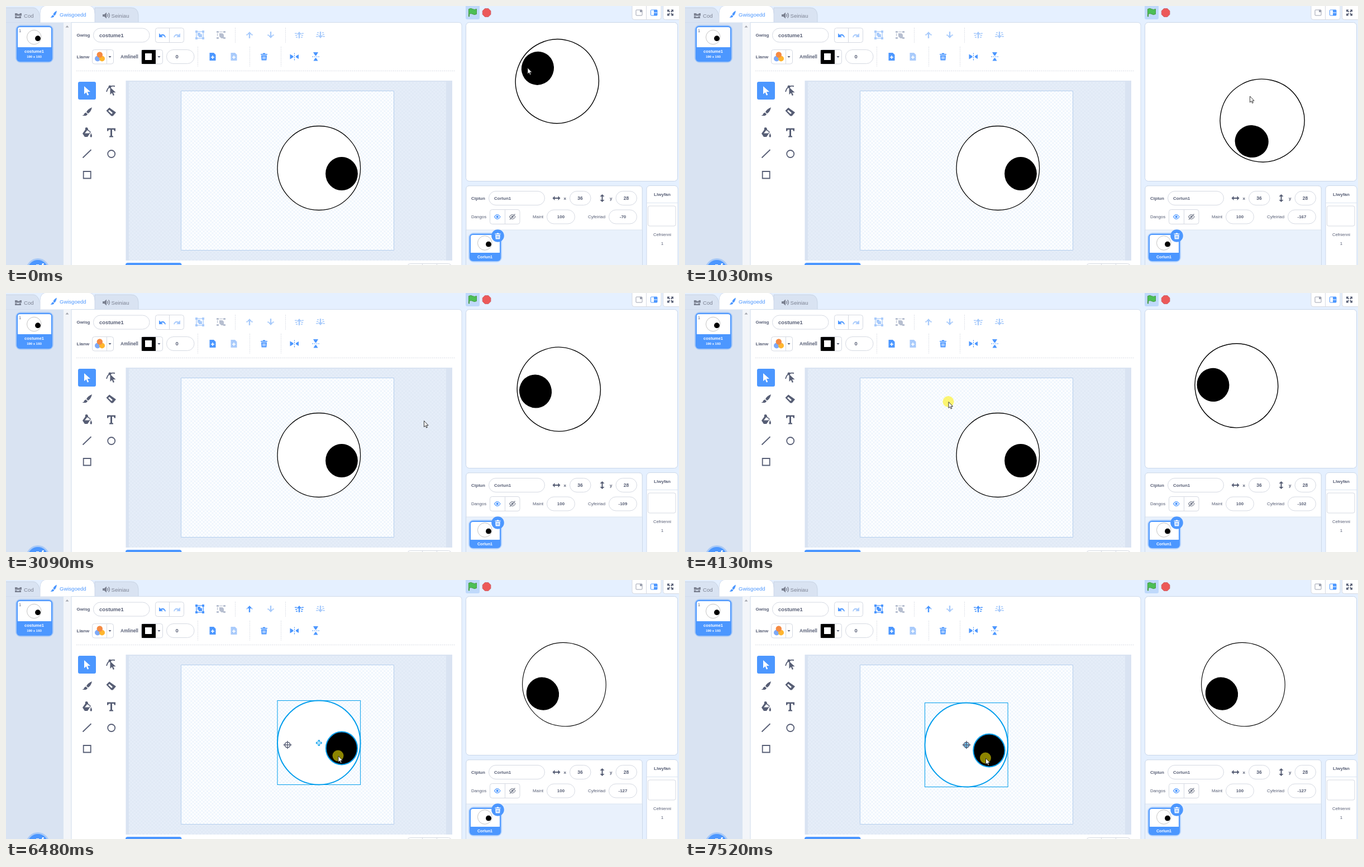
Animation of 1205x465 px, one loop 8000 ms. Source, as an HTML page:

```html
<!DOCTYPE html>
<html lang="cy">
<head>
<meta charset="utf-8">
<title>Googly eye editor</title>
<style>
html, body { margin: 0; width: 100%; height: 100%; overflow: hidden; background: #e5f0ff; }
svg { display: block; font-family: "Liberation Sans", Arial, sans-serif; font-size: 8px; fill: #575e75; }
.b { font-weight: bold; }
.m { text-anchor: middle; }
.box { fill: #fff; stroke: #d5d9e2; }
.sep { stroke: #d9dde5; stroke-dasharray: 2 1.5; fill: none; }
.blue { fill: #4c97ff; }
.pale { fill: #a9cbfb; }
.on { fill: #4c97ff; }
.white { fill: #fff; }
.line { fill: none; stroke: #575e75; stroke-width: 1.8; }
.glow { fill: none; stroke: #4c97ff; stroke-opacity: .35; stroke-width: 6; }
.guide { fill: none; stroke: #009dec; }
</style>
</head>
<body>
<svg width="1205" height="465" viewBox="0 0 1205 465">
<defs>
  <pattern id="out" width="6.35" height="6.35" patternUnits="userSpaceOnUse"><path fill="#e6eef9" d="M0 0h6.35v6.35H0z"/><path fill="#e0e9f5" d="M0 0h3.175v6.35h3.175V3.175H0z"/></pattern>
  <pattern id="in" width="6.35" height="6.35" patternUnits="userSpaceOnUse"><path fill="#fff" d="M0 0h6.35v6.35H0z"/><path fill="#eef5fd" d="M0 0h3.175v6.35h3.175V3.175H0z"/></pattern>
  <clipPath id="stageClip"><rect x="824" y="30" width="378" height="284" rx="6"/></clipPath>
  <g id="eye"><ellipse cx="56.3" cy="-5" rx="74.3" ry="75.5" fill="#fff"/><ellipse cx="97" cy="5" rx="28.2" ry="29.4" fill="#000"/></g>
  <g id="thumb"><circle r="12.8" fill="#fff" stroke="#aaa" stroke-width=".7"/><circle cx="6.7" cy="2.2" r="4.9" fill="#000"/></g>
  <path id="undo" d="M-6-4v7h7l-2.4-2.3q3.8-2.2 6 2.8l1.4-.5q-2.6-7.800-9.200-4.200z"/>
  <path id="up" d="M0-6l4.500 5H1.200V6h-2.400v-7h-3.300z"/>
  <path id="bin" d="M-6-5h3.500l1-1.600h3l1 1.600H6v1.600H-6zM-5-2.400H5L4.400 6.500h-8.800zM-2.500-.6v5h1v-5zM-.5-.6v5h1v-5zM1.500-.6v5h1v-5z" fill-rule="evenodd"/>
  <path id="page" d="M-5.500-7H2l3.500 3.500V7h-11zM-.8-2v2.200H-3v1.600h2.200V4H.8V1.800H3V.2H.8V-2z" fill-rule="evenodd"/>
  <path id="flip" d="M-8-4.500v9L-2 1v-2zM-.6-6.500H.6v2H-.6zm0 3.500H.6v2H-.6zm0 3.500H.6v2H-.6zM-.6 4H.6v2.500H-.6zM2.500-1 7.500-4v8l-5-3z"/>
  <path id="arrow" d="M0 0v13l3.300-3 2 5 2.200-1-2.200-4.800h4.700z"/>
  <path id="span" d="M-7 0l4-4v3h6v-3l4 4-4 4v-3h-6v3z"/>
</defs>

<!-- tabs -->
<path fill="#d9e3f2" stroke="#c8d3e4" d="M-1 30V3h49q13 0 14 27z"/>
<path fill="#d9e3f2" stroke="#c8d3e4" d="M159 30V3h65q12 0 13 13v14z"/>
<path fill="#fff" stroke="#d2dced" d="M61 30V14Q61-1 74-1h72q13 0 13 15v16z"/>
<g fill="#7c8292" font-size="9.6">
  <path d="M16 13h4l1 1.500h3L25 13h3v4.500H16zM16 18.500h3l1 1.300h3l1-1.300h3V22H16z"/>
  <text x="32" y="20.500">Cod</text>
  <path d="M173 15h3l4-3.500v11L176 19h-3z"/><path fill="none" stroke="#7c8292" stroke-width="1.300" d="M181.500 14.500q2 2.500 0 5M183.500 12.500q4 4.500 0 9"/>
  <text x="188.500" y="20.500">Seiniau</text>
</g>
<g class="blue"><path d="M91 8.500q-6 3-6.500 7l2.500 2q3-2.500 4-9zM84 16.200l2.300 1.800q-.5 3.500-6.800 2.500 2.500-.8 2.500-3z"/><text x="96" y="18.500" font-size="9.500">Gwisgoedd</text></g>

<!-- costume list -->
<path fill="#d9e3f2" d="M0 30h103v435H0z"/><path fill="#f3f5f9" d="M103 30h14v435h-14z"/><path fill="#a3a6ad" d="M106.500 38.500l3-3.500 3 3.500z"/>
<rect class="glow" x="20" y="37" width="62" height="62" rx="6"/>
<rect class="blue" x="19" y="36" width="64" height="64" rx="6"/><path class="white" d="M21 42q0-4 4-4h52q4 0 4 4v32H21z"/>
<text x="23" y="47" font-size="7.500">1</text><use href="#thumb" x="50.300" y="56"/>
<g class="white b m"><text x="50.500" y="84" font-size="7.500">costume1</text><text x="50.500" y="93" font-size="6">190 x 193</text></g>
<circle class="glow" cx="57" cy="474" r="18"/><circle class="blue" cx="57" cy="474" r="18"/><path class="white" d="M64 465l1-3 3 0-1 3zM54 464h5v1h-5z"/>

<!-- editor -->
<path fill="#fff" stroke="#d0dcec" d="M117 466V29.500h693q6 0 6 6V466z"/>
<g class="b"><text x="126.500" y="55">Gwisg</text><text x="126.500" y="93.500">Llanw</text><text x="205" y="93.500" font-size="8.200">Amlinell</text></g>
<rect class="box" x="156.500" y="40" width="100.500" height="25" rx="12.500"/><text class="b" x="167" y="56" font-size="9.400">costume1</text>
<rect class="box" x="267.500" y="39.500" width="51" height="26" rx="4"/><path class="box" d="M292.500 40v25.500"/>
<use href="#undo" class="blue" x="280" y="53"/><use href="#undo" class="pale" transform="translate(306 53)scale(-1 1)"/>
<g id="tools">
  <g class="pale" transform="translate(347 52)"><path fill-rule="evenodd" d="M-8-8h4v1.200h8V-8h4v4H6.800v8H8v4H4V6.800h-8V8h-4V4h1.200v-8H-8zM-5.500-4v8h1.500v1.500h8V4h1.500v-8H4v-1.500h-8V-4z"/><path d="M-4-4h5v2.500h3V4h-6V1.500h-2z"/></g>
  <use href="#up" class="pale" x="436" y="52"/>
  <g class="pale" transform="translate(525 52)"><use href="#up"/><path d="M-8-3.500h4V-2h-4zM4-3.500h4V-2H4zM-7 0h3.500v1.500H-7zM3.500 0H7v1.500H3.500zM-6 3.500h3V5h-3zM3 3.500h3V5H3z"/></g>
</g>
<path class="pale" d="M430 51h3v1.500h-3zM439 51h3v1.500h-3zM468 51.500h3V53h-3zM477 51.500h3V53h-3z"/>
<g fill="#b7bfd0" transform="translate(385 52)"><path d="M-8-7h4v3h-4zM4-7h4v3H4zM-8 4h4v3h-4zM4 4h4v3H4zM-3-6h6v1h-6zM-7-3h1v5h-1zM-3-3h5V0h3v6H0V2h-3z"/><circle cx="1" cy="1" r="4"/></g>
<use href="#up" class="pale" transform="translate(474 52)scale(1 -1)"/>
<g class="pale" transform="translate(563 52)scale(1 -1)"><use href="#up"/><path d="M-8-3.500h4V-2h-4zM4-3.500h4V-2H4zM-7 0h3.500v1.500H-7zM3.500 0H7v1.500H3.500zM-6 3.500h3V5h-3zM3 3.500h3V5H3z"/></g>
<path class="sep" d="M410.500 39v27M500.500 39v27M343.500 73v36M436.500 73v36M492.500 73v36M126 116.500h679"/>
<rect class="box" x="154.500" y="78.500" width="38" height="25.500" rx="4"/><path class="box" d="M180.500 79v25"/>
<circle cx="164" cy="94.500" r="5" fill="#7da9f8"/><circle cx="172" cy="94.500" r="5" fill="#ffb52e"/><circle cx="167.800" cy="87.500" r="5.200" fill="#f58a42"/>
<rect class="box" x="242.500" y="78.500" width="38" height="25.500" rx="4"/><path d="M243 79h25v25h-25z" fill="#000"/><path class="white" d="M249 85h12v12h-12z"/>
<path d="M183.500 90h5l-2.500 3zM271.500 90h5l-2.500 3z"/>
<rect class="box" x="287.500" y="78.500" width="49.500" height="25" rx="12.500"/><text class="b m" x="306" y="94" font-size="9.400">0</text>
<use href="#page" class="blue" x="370" y="91"/><use href="#page" class="pale" x="408" y="91"/><use href="#bin" class="blue" x="462" y="91"/>
<use href="#flip" class="blue" x="516.500" y="91"/><use href="#flip" class="blue" transform="translate(554.500 91)rotate(90)"/>

<!-- paint tools -->
<rect class="blue" x="129" y="136" width="32" height="32" rx="3"/><use href="#arrow" class="white" transform="translate(140 144)scale(1.100)"/>
<use href="#arrow" transform="translate(186.500 146)"/><path class="line" stroke-width="1.200" d="M180 154q2-7 6-9t9-1"/><circle cx="186" cy="145" r="2.500"/>
<path d="M154 182q-8 3-10 8.500l3 2.500q5-2.500 7-11zM143 191.500l3 2.500q-1 4.500-10 2.500 4-.5 4-3 1-2 3-2z"/>
<path d="M179.500 188l5.500-5.500 12 8.500-5.500 6.500h-3zM183 188.500l6 5.500 2-2-6-5.500z" fill-rule="evenodd"/>
<path fill-rule="evenodd" d="M137 229l5-7q-1-4 2-4t3 4l5 4-6 9h-5zM141 228.500h8l1.500-2-5-3.500zM152 228q3 5 1.500 7t-3-1z"/>
<path d="M181 219.500h15v5h-2l-1-2.500h-3v11l2 .8v1.700h-7v-1.700l2-.8v-11h-3l-1 2.500h-2z"/>
<path class="line" d="M137.500 272.500l15-14.500M138.700 297h13v12.500h-13z"/><circle class="line" cx="188.700" cy="265.500" r="6.500"/>

<!-- canvas -->
<path fill="#d9e3f2" d="M214.500 134H799v323H214.500z"/><path fill="url(#out)" d="M220 136h568v321H220z"/>
<path fill="url(#in)" stroke="#b5cfee" d="M313.500 152.500h381v286h-381z"/>
<rect class="blue" x="214" y="461" width="100.500" height="20" rx="4"/><rect class="box" x="719.500" y="462.500" width="77" height="20" rx="4"/><path class="box" d="M745.500 463v5M771.500 463v5"/>
<use id="costume" href="#eye"/>
<g id="pick"><rect class="guide" x="-18" y="-80.500" width="148.600" height="151"/><path class="guide" stroke-width="3.500" d="M51-4.500h10.500M56.300-9.800V.7"/><path stroke="#fff" stroke-width="1.300" d="M52.500-4.500h7.600M56.300-8.300V-.7"/></g>
<g id="handles" class="guide" style="fill:#fff"></g>
<g id="cross" fill="none" stroke="#575e75" stroke-width="1.600" transform="translate(504 296)"><circle r="4.800"/><path stroke-width="1.300" d="M-7.300 0H7.300M0-7.300V7.300"/></g>
<rect id="marquee" x="471.500" y="195.500" fill="none" stroke="#9a9da5" stroke-width=".9" stroke-dasharray="3 2"/>

<!-- stage -->
<rect fill="#bfd9fb" x="823" y="-4" width="25" height="28" rx="3"/>
<path fill="#4cbf56" stroke="#45993d" d="M828.500 19V5.500q4-2 7 0t7 0v9q-4 2-7 0t-6 0V19z"/>
<path fill="#ec5959" stroke="#c95f68" stroke-width=".8" d="M857.500 4.500h6.200l4.300 4.300v6.400l-4.300 4.300h-6.200l-4.300-4.300V8.800z"/>
<rect class="box" x="1121" y="-5" width="52" height="29.500" rx="4"/><path class="box" d="M1146.500 0v24"/><rect class="box" x="1176.500" y="-5" width="32" height="29.500" rx="4"/>
<rect x="1128" y="7" width="11" height="10" rx="1" fill="none" stroke="#9a9fae"/><path fill="#9a9fae" d="M1135 7h4v4h-4z"/>
<rect x="1154.500" y="7" width="11.500" height="10" rx="1" fill="none" stroke="#4c97ff"/><path class="blue" d="M1160 7h6v10h-6z"/><path class="white" d="M1160 11.500h6v1h-6z"/>
<path d="M1184 6.500h4.500l-1.500 1.500 2 2-1.500 1.500-2-2-1.500 1.500zM1195 6.500v4.500l-1.500-1.500-2 2-1.500-1.500 2-2-1.500-1.500zM1184 17.500V13l1.500 1.500 2-2 1.500 1.500-2 2 1.500 1.500zM1195 17.500h-4.500l1.500-1.500-2-2 1.500-1.500 2 2 1.500-1.500z"/>
<rect class="box" x="823.500" y="29.500" width="379" height="285" rx="6" style="stroke:#c9d6e8"/>
<g clip-path="url(#stageClip)"><use id="sprite" href="#eye" stroke="#000"/></g>

<!-- sprite info -->
<path fill="#e9f1fc" stroke="#d0dcec" d="M823.500 466V328q0-6 6-6h304q6 0 6 6v138z" transform="translate(0 0)" display="none"/>
<rect x="823.500" y="322.500" width="316" height="160" rx="6" fill="#e9f1fc" stroke="#ccd8e9"/>
<path fill="#fff" stroke="#dbe4f0" d="M824 402V329q0-6 6-6h303q6 0 6 6v73z"/>
<g class="box">
  <rect x="864.500" y="332.500" width="100" height="25" rx="12.500"/><rect x="1009.500" y="332.500" width="37.500" height="25" rx="12.500"/><rect x="1092" y="332.500" width="37.500" height="25" rx="12.500"/>
  <rect x="866.500" y="365.500" width="53.500" height="26" rx="4"/><path d="M893.500 366v25"/>
  <rect x="968.500" y="366" width="50" height="25" rx="12.500"/><rect x="1079.500" y="366" width="50" height="25" rx="12.500"/>
</g>
<g class="b"><text x="833" y="347.500">Ciplun</text><text x="874" y="347.500">Corlun1</text><text x="998.500" y="347.500">x</text><text x="1081" y="347.500">y</text></g>
<g class="b m"><text x="1028" y="347.800" font-size="8.500">36</text><text x="1110.500" y="347.800" font-size="8.500">28</text><text x="993.500" y="381">100</text><text id="dir" x="1104.500" y="381"></text></g>
<g font-size="7.900"><text x="833" y="381">Dangos</text><text x="943" y="381">Maint</text><text x="1042" y="381">Cyfeiriad</text></g>
<use href="#span" x="985.500" y="345"/><use href="#span" transform="translate(1067.500 345)rotate(90)"/>
<g fill="none" stroke-width="1.200"><path stroke="#4c97ff" d="M874.500 378.500q5-8 10.500 0-5.500 8-10.500 0z"/><circle class="blue" cx="879.700" cy="378.500" r="2.200"/><path stroke="#7c8292" d="M901.500 378.500q5-8 10.500 0-5.500 8-10.500 0zM902 383.500l9.500-10"/><circle fill="#7c8292" cx="906.700" cy="378.500" r="2"/></g>
<rect class="glow" x="831" y="410" width="54" height="47" rx="6"/><rect class="blue" x="830" y="409" width="56" height="49" rx="6"/><path class="white" d="M832 415q0-4 4-4h44q4 0 4 4v28h-52z"/>
<use href="#thumb" x="857.300" y="425.500"/><text class="b m white" x="857.500" y="452.500" font-size="7.200">Corlun1</text>
<circle class="blue" cx="880.500" cy="412.500" r="11.300"/><use href="#bin" class="white" transform="translate(880.500 413)scale(.85)"/>
<rect class="box" x="1147" y="322.500" width="56" height="160" rx="6" style="stroke:#ccd8e9"/><path stroke="#dbe4f0" d="M1147 353.500h56"/>
<rect class="box" x="1149.500" y="359" width="49.500" height="36" rx="3"/>
<g class="m"><text class="b" x="1175" y="340.500">Llwyfan</text><text x="1175" y="412.500" font-size="7.600">Cefnienni</text><text x="1175" y="428.500">1</text></g>

<circle id="press" r="10" fill="#fff000" fill-opacity=".55"/>
<path id="cursor" fill="#fff" stroke="#222" stroke-width=".9" d="M0 0v11l2.500-2.300 1.700 3.800 1.700-.8-1.700-3.600h3.400z"/>
</svg>
<script>
const $ = id => document.getElementById(id);
const LOOP = 8000;

// bursts of movement: start, end, steps; the picture rests between them
const bursts = [
  [80, 230, 3], [400, 1200, 11], [1280, 1520, 4], [1820, 2150, 5], [2620, 3410, 11], [3500, 3810, 5],
  [4130, 4910, 11], [4990, 5060, 2], [5460, 6240, 11], [6410, 6650, 4], [6880, 6970, 2], [7120, 7520, 6]
];

// time, pointer x, pointer y, sprite direction
const keys = [
  [0, 934, 111, -70], [80, 948, 98, -60], [230, 985, 85, -41],
  [400, 995, 95, -42], [640, 1030, 140, -50], [720, 1050, 160, -221], [800, 1056, 178, -218],
  [960, 1035, 176, -180], [1040, 1011.5, 162, -167], [1120, 1003, 158, -115], [1200, 998, 156, -98],
  [1360, 975, 126, -62], [1520, 992, 156, -99], [1820, 995, 150, -95], [2150, 958, 120, -70],
  [2620, 945, 120, -73], [3094, 748.5, 229.5, -109], [3410, 487, 188, -100], [3810, 472, 195.5, -102],
  [4130, 472, 195.5, -102], [4616, 580, 314, -127], [4910, 648, 389, -127], [5060, 680, 399, -127],
  [5460, 680, 399, -127], [6240, 595, 315, -127], [6410, 595, 315, -127], [6490, 595, 316, -127],
  [6650, 596, 322.5, -127], [6970, 563, 320, -127], [7520, 538.5, 320, -127]
];

function snap(t) {
  const b = bursts.findLast(([start]) => start <= t);
  if (!b) return 0;
  const [start, end, n] = b, step = (end - start) / (n - 1);
  return start + step * Math.min(n - 1, Math.floor((t - start) / step + .2));
}

function pose(t) {
  const i = keys.findLastIndex(k => k[0] <= t + .01), a = keys[i], b = keys[i + 1] || a;
  const u = a === b ? 0 : Math.max(0, (t - a[0]) / (b[0] - a[0]));
  return [1, 2, 3].map(j => a[j] + (b[j] - a[j]) * u);
}

const set = (id, attrs) => { for (const k in attrs) $(id).setAttribute(k, attrs[k]); };
const show = (id, on) => set(id, { display: on ? "inline" : "none" });

// selection handles and the rotation grip
let grips = '<path d="M50.500 82q5.800 6 11.600 0M50 85v-3.500h3.500M62.600 85v-3.500h-3.500" style="fill:none" stroke-width="1.5"/>';
for (const x of [-18, 56.3, 130.6])
  for (const y of [-80.5, -5, 70.5])
    if (x !== 56.3 || y !== -5) grips += `<circle cx="${x}" cy="${y}" r="3.2"/>`;
$("handles").innerHTML = grips;

function draw(time) {
  const t = snap(time), [x, y, dir] = pose(t);
  const selected = t >= 5460, drag = t >= 6410, marquee = t >= 4130 && !selected;
  const dx = drag ? x - 595 : 0, dy = drag ? y - 315 : 0;
  const place = { transform: `translate(${504 + dx} ${296 + dy})` };

  set("sprite", { transform: `translate(1041.4 149.7) rotate(${dir - 90})`, "stroke-width": selected ? 1.1 : 1.4 });
  $("dir").textContent = Math.round(dir <= -180 ? dir + 360 : dir);
  set("costume", { ...place, stroke: selected ? "#009dec" : "#000", "stroke-width": selected ? 2 : 1.3 });
  set("pick", place);
  set("handles", place);
  show("pick", selected);
  show("handles", selected && !drag);
  show("cross", drag);
  for (const el of $("tools").children) el.setAttribute("class", selected ? "on" : "pale");

  show("marquee", marquee);
  set("marquee", { width: Math.max(0, x - 471.5), height: Math.max(0, y - 195.5) });
  show("press", marquee || drag);
  set("press", { cx: x - .5, cy: y - .5 });
  set("cursor", { transform: `translate(${x} ${y})` });
}

const origin = performance.now();
function tick() {
  draw((performance.now() - origin) % LOOP);
  requestAnimationFrame(tick);
}
tick();
</script>
</body>
</html>
```
